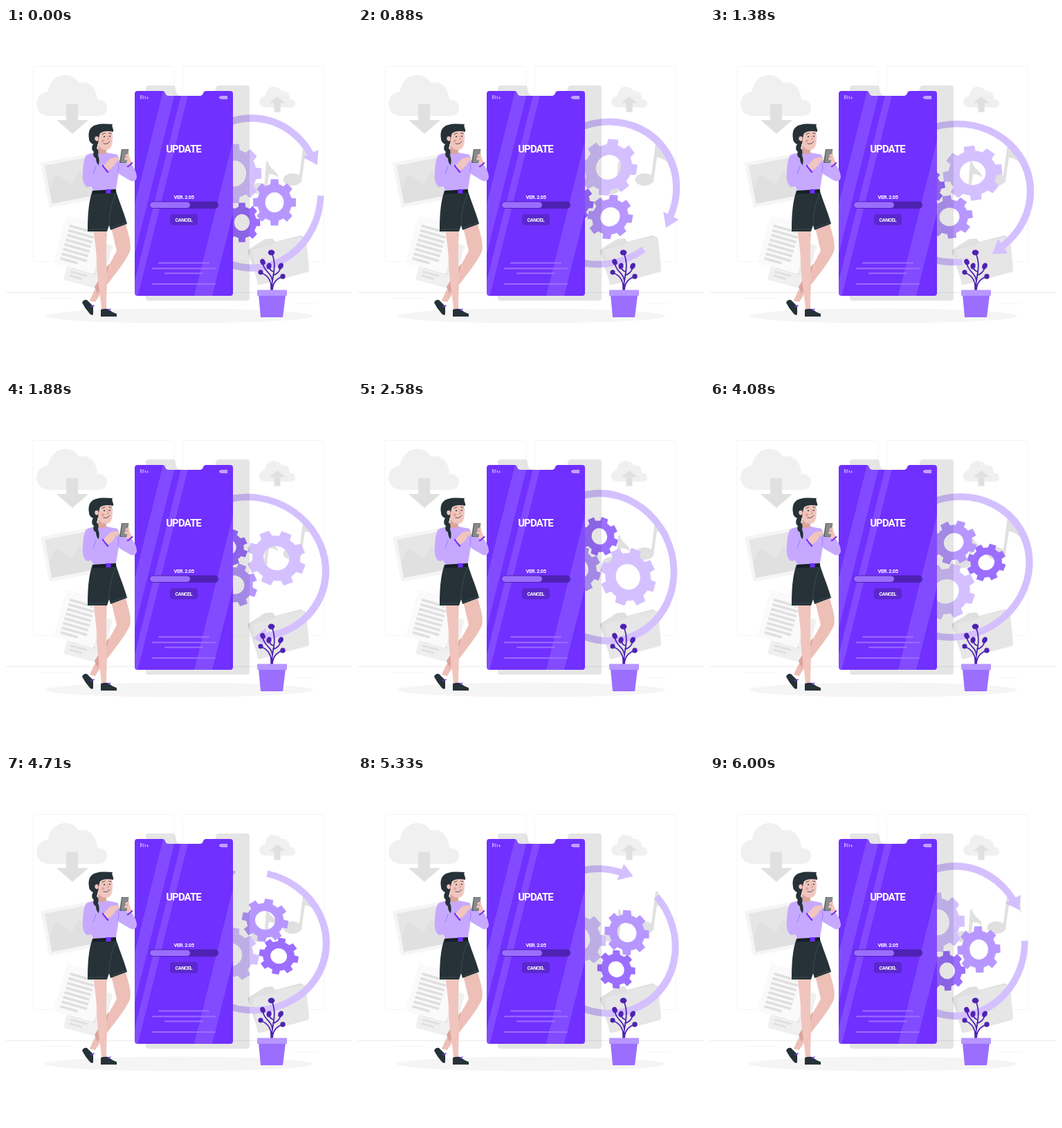
An HTML page that plays this animation: 500 px wide and 500 px high, repeating every 6040 ms.

```html
<!DOCTYPE html>
<html lang="en">
<head>
<meta charset="utf-8">
<title>Update</title>
<style>
  html, body { margin: 0; width: 100%; height: 100%; overflow: hidden; background: #fff; }
  svg { display: block; width: 100%; height: 100%; }
  text { font-family: Roboto, "Liberation Sans", sans-serif; font-weight: 700; font-stretch: condensed; letter-spacing: -.06em; fill: #fff; text-anchor: middle; }
  .line { fill: none; stroke-linecap: round; stroke-linejoin: round; }
</style>
</head>
<body>
<svg viewBox="0 0 500 500">
  <defs>
    <path id="screen" d="M190 91H226Q229 91 230 94Q231 98 235 98H280Q284 98 285 94Q286 91 289 91H324Q328 91 328 95V383Q328 387 324 387H190Q186 387 186 383V95Q186 91 190 91Z"/>
    <clipPath id="clip"><use href="#screen"/></clipPath>
  </defs>

  <!-- room -->
  <g fill="none" stroke="#f5f5f5">
    <rect x="39" y="55.5" width="204" height="282" rx="3"/>
    <rect x="255" y="55.5" width="204" height="282" rx="3"/>
    <path stroke="#ebebeb" d="M0 382.5H500"/>
    <path d="M50 390.5H98M416 398.5H449"/>
  </g>
  <ellipse cx="250" cy="416" rx="194" ry="10.5" fill="#f5f5f5"/>

  <!-- clouds -->
  <g fill="#f0f0f0">
    <path d="M62 127A17 17 0 0 1 61 92C62 78 73 68 86 68C95 68 102 73 105 79C119 75 131 85 132 104C141 103 146 109 146 115C146 122 141 127 134 127Z"/>
    <path d="M375 115C369 115 366 111 366 107C366 102 370 99 375 98C375 90 380 85 386 85C392 85 396 88 398 91C405 90 410 95 410 103C415 102 418 105 418 109C418 113 415 115 411 115Z"/>
  </g>
  <g fill="#e0e0e0">
    <path d="M87 110H104V133H119L96 153L73 133H87Z"/>
    <path d="M392 99L404 108.500H396.500V121.500H387.500V108.500H380.500Z"/>
  </g>

  <!-- picture and documents -->
  <g transform="translate(50 195) rotate(-11)">
    <rect width="76" height="66" rx="2" fill="#f5f5f5"/>
    <rect x="5" y="5" width="66" height="56" fill="#e6e6e6"/>
    <path d="M5 40L17 22Q20 20 23 23L38 39L52 23L71 45V61H5Z" fill="#e0e0e0"/>
  </g>
  <g transform="translate(100 300) rotate(15)">
    <rect width="56" height="66" rx="2" fill="#f0f0f0"/>
    <path d="M7 52H32M7 58H26M7 46H42" stroke="#e0e0e0" stroke-width="3"/>
  </g>
  <g transform="translate(88 271) rotate(16)">
    <rect width="60" height="71" rx="2" fill="#fafafa"/>
    <path d="M8 13H43M8 20H46M8 27H46M8 34H46M8 41H46M8 48H46M8 55H46M8 62H34" stroke="#e0e0e0" stroke-width="3.800"/>
  </g>

  <!-- folder and notes -->
  <path d="M349 321L371 307Q373 305 376 305L385 304L389 309L424 300Q428 299 430 303L438 350L365 371Z" fill="#e0e0e0"/>
  <path d="M356 321L386 314L390 309L428 302Q433 301 434 306L438 349Q438 352 435 353L368 371Q364 372 363 368Z" fill="#e6e6e6"/>
  <g fill="#e0e0e0">
    <ellipse cx="414" cy="219" rx="13.500" ry="9"/>
    <path d="M430 167H434C434 182 450 181 450 198C445 190 438 188 432 187L427 220H423Z"/>
    <ellipse cx="366" cy="232" rx="12" ry="8"/>
    <path d="M376 193H379C380 204 393 206 393 216C389 211 383 212 380 211L377 233H373Z"/>
  </g>

  <g id="spin">
    <path id="ring" fill="none" stroke="#d4c0ff" stroke-width="10.400"/>
    <path d="M81 -52L104 -62L102 -41.500Z" fill="#d4c0ff" stroke="#d4c0ff" stroke-linejoin="round"/>
  </g>

  <!-- phone -->
  <path d="M206 83H241Q244 83 245 87Q246 98 252 98H297Q302 98 303 87Q304 83 308 83H348Q352 83 352 87V390Q352 394 348 394H206Q202 394 202 390V87Q202 83 206 83Z" opacity=".1"/>
  <use href="#screen" fill="#7030ff"/>
  <path clip-path="url(#clip)" fill="#fff" opacity=".13" d="M227 91H245L171 387H153ZM254.500 91H264.500L190.500 387H180.500ZM346 91H372L298 387H272Z"/>
  <g fill="#fff" opacity=".55">
    <path d="M194 97H196V102.500H194ZM197.500 97.500H199V102.500H197.500ZM200.500 98.500H202V102.500H200.500ZM203.500 99.500H205.500V102.500H203.500Z"/>
    <path d="M308 99H310V98H320V103H310V102H308Z"/>
  </g>
  <text x="256.500" y="180" font-size="15">UPDATE</text>
  <text x="257" y="246.800" font-size="7.500">VER. 2.05</text>
  <rect x="207" y="250.500" width="100" height="10.500" rx="5.200" fill="#4e22b3"/>
  <rect x="208" y="251.500" width="58" height="8.500" rx="4.200" fill="#9b6eff"/>
  <rect x="237" y="269" width="40" height="16" rx="4" fill="#5a28cc"/>
  <text x="256.800" y="279.700" font-size="7.200">CANCEL</text>
  <path class="line" d="M221 339.500H293M212 347.500H302M230 354.500H284M212 370H302" stroke="#9b6eff" stroke-width="2"/>

  <!-- plant -->
  <g class="line" stroke="#4e22b3" stroke-width="1.800">
    <path d="M384 379C383 362 393 346 384 325M383.500 379C384 366 380 358 369 354M385 378C386 367 391 363 399 359M386 357C391 356 396 352 397 345M384.500 364C384 354 372 352 371 339M386 352Q381 350 380 345"/>
    <path stroke-width="3.200" d="M384 379V371"/>
  </g>
  <g fill="#4e22b3">
    <ellipse cx="383.500" cy="324.500" rx="4.800" ry="4"/>
    <ellipse cx="371" cy="338" rx="3.600" ry="4.500" transform="rotate(-25 371 338)"/>
    <ellipse cx="380" cy="344" rx="3.600" ry="4.600" transform="rotate(15 380 344)"/>
    <ellipse cx="397" cy="344" rx="3.600" ry="4.800" transform="rotate(30 397 344)"/>
    <circle cx="368" cy="353" r="3.600"/>
    <circle cx="400" cy="359" r="3.700"/>
  </g>
  <path d="M365 386H404L400 418H368Z" fill="#9b6eff"/>
  <rect x="363" y="378.500" width="43" height="8.500" rx="1" fill="#b797ff"/>

  <!-- woman -->
  <g fill="#edbfb7">
    <path d="M150 280H172C177 298 182 313 179 323C169 345 146 368 129 396L121 394C130 372 148 346 160 322Z"/>
    <path d="M128 374L149 340L143 368L132 384Z" fill="#dba59c"/>
    <path fill="#f0c5bd" d="M126 290H146C145 315 145 330 145 342C147 365 145 388 145 408H138C136 380 131 360 131 340C131 322 128 306 126 290Z"/>
  </g>
  <g fill="#263238">
    <path d="M110 397Q112 392 117 393L126 402V414Q124 416 121 413Q114 405 110 397Z"/>
    <path d="M137 407Q142 405 148 406Q153 411 160 413V417H137Z"/>
    <path d="M125 235L158 233C164 252 171 268 175 283L151 292L149 285L146 294H118C118 272 119 252 125 235Z"/>
  </g>
  <path class="line" d="M158 240C152 256 149 270 149 285M119 291H146M152 289L174 281" stroke="#455a64" stroke-width=".6"/>
  <path class="line" d="M123 403L127 401M148 408L151 406" stroke="#7030ff" stroke-width="1.500"/>
  <path d="M133 170H145V183Q140 191 132 184Z" fill="#dba59c"/>
  <path d="M116 184C122 181 129 180 133 180Q139 186 145 180L161 183C167 193 162 214 159 234L126 236C125 228 123 230 119 228C110 222 109 194 116 184Z" fill="#c6a9ff"/>
  <path d="M161 190L178 194C183 198 189 207 189 216C188 222 182 223 177 219L160 209Z" fill="#c6a9ff"/>
  <path d="M116 190C110 202 109 220 114 227C118 235 130 225 147 207L140 198C135 203 130 207 126 211C127 203 126 190 116 190Z" fill="#c6a9ff"/>
  <path class="line" d="M126 211L130 200M161 208C164 205 163 200 162 196" stroke="#9b6eff" stroke-width=".9"/>
  <path class="line" d="M140 199L147 208M176 200L182 195" stroke="#7030ff" stroke-width="2.500" stroke-linecap="butt"/>
  <path d="M126 235L159 233V238L125 240Z" fill="#162025"/>
  <rect x="144.500" y="233" width="7" height="6" fill="#7030ff"/>
  <path d="M141 199L150 189Q157 186 164 187L163 191L158 195Q155 202 147 206Z" fill="#f0c5bd"/>
  <path d="M171 182Q175 176 177 180L179 188L182 194L176 199L170 190Z" fill="#f0c5bd"/>
  <path d="M167 175H177L174 195H164Z" fill="#455a64"/>
  <path d="M168 175.500H177.500L174.500 194.500H165.500Z" fill="#8a8a8a"/>
  <path d="M172 184L177 181L178 184L173 187M171 188L177 186L178 190L172 191" fill="#f0c5bd"/>
  <path d="M131 151L152 148Q155 154 153.500 166Q152 175 146 176Q137 177 132 167Z" fill="#f0c5bd"/>
  <path d="M132 168C121 170 117 157 121 147C126 138 138 138 154 139C152 142 156 146 155 150C147 148 140 149 136 152C134 156 134 161 133 167Z" fill="#263238"/>
  <ellipse cx="131" cy="160" rx="2.700" ry="3.500" fill="#f0c5bd"/>
  <path d="M121 156C118 162 122 166 126 168C123 172 124 177 127 179C125 183 127 187 130 188C130 193 132 197 134 198C135 193 135 188 133 184C134 180 134 176 131 174C133 169 133 166 129 162Z" fill="#263238"/>
  <circle cx="142" cy="157" r="1" fill="#263238"/>
  <circle cx="150" cy="156.500" r="1" fill="#263238"/>
  <path class="line" d="M139 153.500L143 152M148.500 152L152 152.500M141 167Q146 169 150 164" stroke="#263238" stroke-width=".8"/>
  <path class="line" d="M146.500 156L148.500 161L146 161.500" stroke="#c98378" stroke-width=".7"/>
  <circle cx="140" cy="163" r="2.200" fill="#e8a39b"/>
</svg>
<script>
const LOOP = 6040;
const spin = document.getElementById('spin');
const polar = (r, deg) => {
  const a = deg * Math.PI / 180;
  return `${(r * Math.cos(a)).toFixed(2)} ${(r * Math.sin(a)).toFixed(2)}`;
};

document.getElementById('ring').setAttribute('d',
  `M${polar(108.2, 2)}A108.2 108.2 0 1 1 ${polar(108.2, -31)}`);

// Eight-toothed wheel with a see-through hub
function addGear(x, y, outer, body, hole, fill) {
  let d = '';
  for (let a = 0; a < 360; a += 45) {
    d += `${a ? `A${body} ${body} 0 0 1 ` : 'M'}${polar(body, a - 14)}`
       + `L${polar(outer, a - 10)}L${polar(outer, a + 10)}L${polar(body, a + 14)}`;
  }
  d += `A${body} ${body} 0 0 1 ${polar(body, -14)}Z`
     + `M${hole} 0A${hole} ${hole} 0 1 0 ${-hole} 0A${hole} ${hole} 0 1 0 ${hole} 0Z`;
  const gear = document.createElementNS('http://www.w3.org/2000/svg', 'path');
  gear.setAttribute('d', d);
  gear.setAttribute('fill', fill);
  gear.setAttribute('fill-rule', 'evenodd');
  gear.setAttribute('transform', `translate(${x} ${y})`);
  spin.append(gear);
}
addGear(-27.4, -28.2, 43.3, 35, 18.8, '#d4c0ff');
addGear(35.8, 13.5, 34, 27, 14.5, '#b797ff');
addGear(-15.2, 42.5, 29, 23, 12, '#9b6eff');

// The wheel group is slightly squeezed across, then turned as one
function draw() {
  const angle = performance.now() % LOOP / LOOP * 360;
  spin.setAttribute('transform', `translate(355 238.500) rotate(${angle}) scale(.923 1)`);
  requestAnimationFrame(draw);
}
draw();
</script>
</body>
</html>
```
